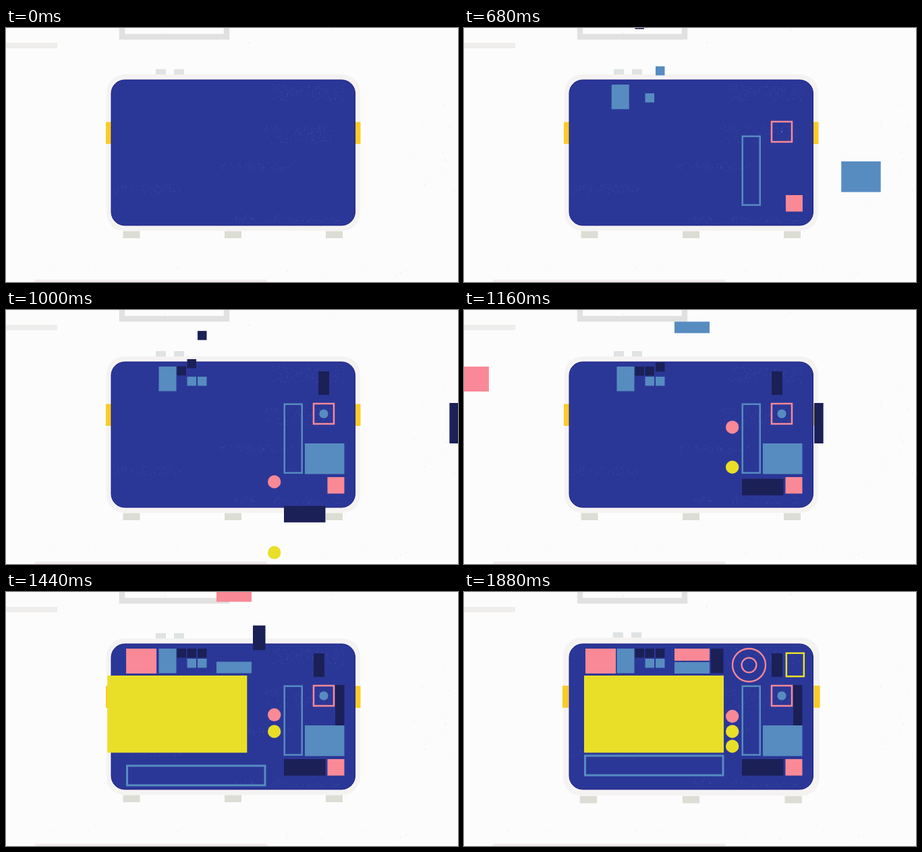
These frames come from a looping animation (670 by 377 pixels, 1.92 s). An HTML page:

```html
<!DOCTYPE html>
<html lang="en">
<head>
<meta charset="utf-8">
<title>Device assembly</title>
<style>
  html, body { margin: 0; width: 100%; height: 100%; overflow: hidden; background: #fcfcfc; }
  svg { display: block; width: 100vw; height: 100vh; }
</style>
</head>
<body>
<svg id="stage" viewBox="0 0 670 377">
  <rect width="670" height="377" fill="#fcfcfc"/>
  <path id="dust" stroke="#ececec" stroke-width="1.5"/>
  <path d="M172 -5V13H327V-5" fill="none" stroke="#e1e1e1" stroke-width="8.5"/>
  <rect y="22" width="76" height="8" fill="#f0eeec"/>
  <rect x="43" y="373.5" width="344" height="4" fill="#f3eaeb"/>
  <g id="casing">
    <path d="M222 61h15v9h-15zM249 61h15v9h-15z" fill="#e0e3e3"/>
    <path d="M173.5 301.5h25v10.5h-25zM324 301.5h25v10.5h-25zM474 301.5h25v10.5h-25z" fill="#dcddd4"/>
    <rect x="149" y="69" width="376" height="232" rx="26" fill="#f5f3f2"/>
    <path d="M148 139.500h9v32.500h-9zM516.500 139.500h9v32.500h-9z" fill="#fbcb28"/>
  </g>
  <rect x="156" y="77" width="361.500" height="216" rx="20" fill="#2b3797" stroke="#1c1f86"/>
  <path id="grain" stroke="#5b6fc0" stroke-opacity=".4"/>
  <g id="parts"></g>
</svg>
<script>
const LOOP = 1920, STEP = 40, MOVE = 380;
const BLUE = '#578cc0', PINK = '#f98996', NAVY = '#1b2057', YELLOW = '#e9df29';
const byId = id => document.getElementById(id);
const parts = [];

const progress = (time, start, length = MOVE) => Math.min(1, Math.max(0, (time - start) / length));
const easeOut = p => 1 - (1 - p) ** 3;

function add(tag, attrs, start, pose) {
  const node = document.createElementNS('http://www.w3.org/2000/svg', tag);
  for (const key in attrs) node.setAttribute(key, attrs[key]);
  byId('parts').append(node);
  parts.push({ node, start, pose });
}

// Distance from the resting place to just outside the given edge.
function offset(side, x, y, w, h) {
  return { left: [-x - w, 0], right: [670 - x, 0], top: [0, -y - h], bottom: [0, 377 - y] }[side];
}

const slide = ([dx, dy]) => p => `translate(${dx * (1 - p)} ${dy * (1 - p)})`;
const grow = (x, y) => p => `translate(${x} ${y}) scale(${p})`;

function box(start, side, fill, x, y, width, height) {
  add('rect', { x, y, width, height, fill }, start, slide(offset(side, x, y, width, height)));
}

function frame(start, side, stroke, x, y, w, h, line = 2.5) {
  add('rect', {
    x: x + line / 2, y: y + line / 2, width: w - line, height: h - line,
    fill: 'none', stroke, 'stroke-width': line
  }, start, slide(offset(side, x, y, w, h)));
}

function ball(start, fill, cy, pose = slide([0, 387 - cy])) {
  add('circle', { cx: 397.7, cy, r: 9.7, fill }, start, pose);
}

function ring(start, r) {
  add('circle', { r, fill: 'none', stroke: PINK, 'stroke-width': 2.3 }, start, grow(422.5, 108.5));
}

add('rect', { x: -15, y: -15, width: 30, height: 30, fill: 'none', stroke: PINK, 'stroke-width': 2.5 },
  327, grow(471, 154));
box(350, 'right', PINK, 476.5, 248, 25, 24.5);
box(400, 'top', BLUE, 268.5, 99, 13.5, 13.5);
box(419, 'left', BLUE, 226.5, 84, 26, 36.5);
frame(469, 'bottom', BLUE, 411.5, 138.5, 28.5, 104.5);
box(574, 'top', BLUE, 284, 99, 13.5, 13.5);
box(604, 'right', BLUE, 443, 198, 58.5, 45.5);
add('circle', { r: 6.6, fill: BLUE }, 660, grow(471, 154));
box(678, 'top', NAVY, 253.5, 84, 13.5, 13.5);
box(742, 'right', NAVY, 456, 91, 16, 35);
box(804, 'top', NAVY, 268.5, 84, 13.5, 13.5);
box(883, 'bottom', NAVY, 412, 248, 61.5, 24.5);
// The pink ball rises too far, then settles on the one below.
ball(900, PINK, 184.5, (p, time) => {
  const settle = easeOut(progress(time, 1340, 200));
  return `translate(0 ${202.5 - 220 * p + 17.5 * settle})`;
});
box(930, 'top', NAVY, 284, 84, 13.5, 13.5);
ball(980, YELLOW, 207);
box(991, 'right', NAVY, 488, 138, 13.5, 60);
box(1120, 'top', BLUE, 312, 104, 52, 17);
box(1138, 'left', PINK, 180, 84, 45, 37);
box(1218, 'left', YELLOW, 178, 124, 207, 114.5);
frame(1242, 'bottom', BLUE, 178, 241.5, 207.5, 32, 3);
box(1310, 'top', NAVY, 366, 84, 18.5, 36.5);
box(1421, 'top', PINK, 312, 84, 52, 18);
ring(1450, 24.5);
ball(1460, YELLOW, 229);
ring(1580, 11);
frame(1590, 'right', YELLOW, 474, 89.5, 28.5, 37);

let seed = 7;
const random = () => (seed = seed * 16807 % 2147483647) / 2147483647;

function scatter(count, x, y, w, h, length) {
  let d = '';
  while (count--) d += `M${x + random() * w} ${y + random() * h}h${length}`;
  return d;
}

byId('dust').setAttribute('d',
  scatter(12, 595, 105, 75, 170, 1.5) + scatter(10, 30, 348, 600, 22, 1.5) + scatter(5, 20, 2, 510, 22, 2));
byId('grain').setAttribute('d',
  scatter(110, 395, 84, 105, 24, 1) + scatter(110, 380, 145, 105, 28, 1) +
  scatter(60, 310, 200, 115, 12, 1) + scatter(60, 160, 233, 98, 13, 1) + scatter(70, 340, 278, 160, 12, 1));

function draw(time) {
  for (const { node, start, pose } of parts) {
    node.style.display = time > start ? '' : 'none';
    node.setAttribute('transform', pose(easeOut(progress(time, start)), time));
  }
  const scale = 1 + 0.011 * easeOut(progress(time, 1780, 100));
  byId('casing').setAttribute('transform',
    `translate(336.5 185) scale(${scale}) translate(-336.5 -185)`);
}

const began = performance.now();
function tick() {
  const time = (performance.now() - began) % LOOP;
  draw(Math.floor(time / STEP) * STEP);
  requestAnimationFrame(tick);
}
tick();
</script>
</body>
</html>
```
